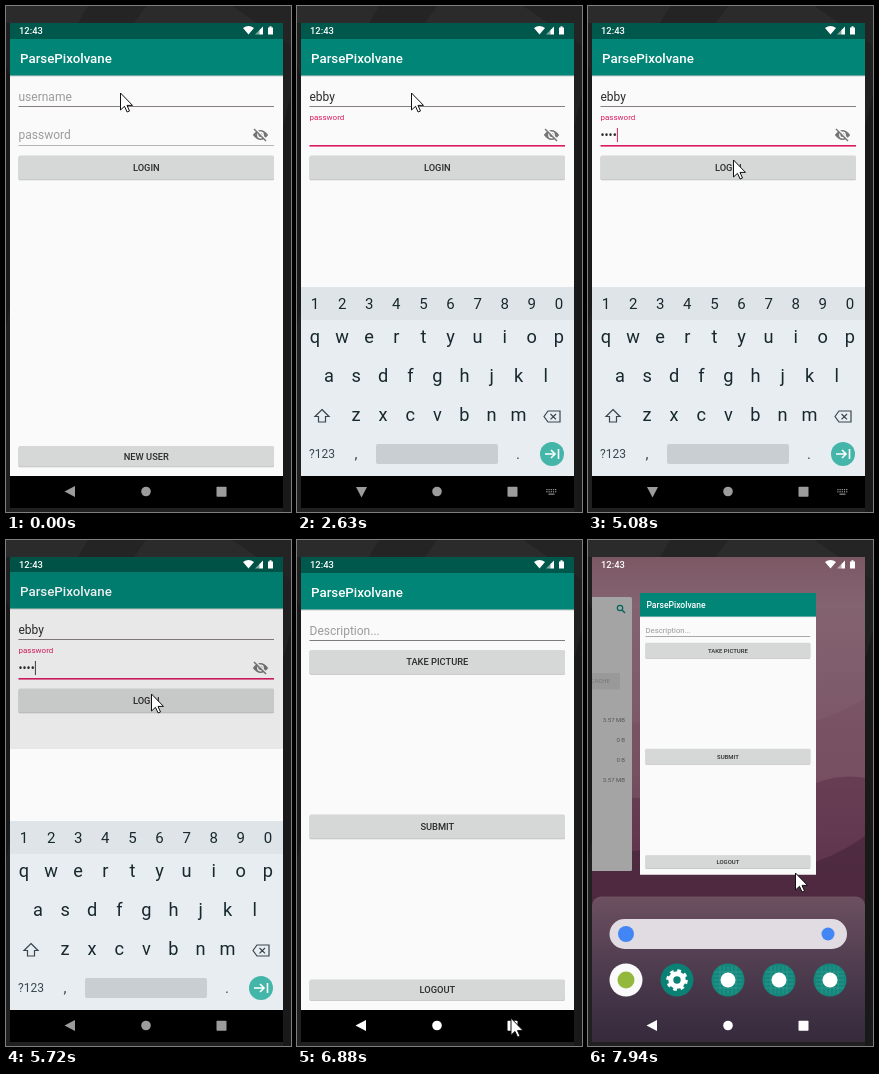
These frames come from a looping animation (285 px wide and 506 px high, 8 s). An HTML page:

```html
<!DOCTYPE html>
<html lang="en">
<head>
<meta charset="utf-8">
<title>Login and post</title>
<style>
  html, body { margin: 0; width: 100%; height: 100%; overflow: hidden; background: #222; }
  svg { display: block; width: 100%; height: 100%; font-family: Roboto, sans-serif; }
  text { white-space: pre; }
</style>
</head>
<body>
<svg id="stage" viewBox="0 0 285 506"></svg>
<script>
const LOOP = 8000, TITLE = 'ParsePixolvane', USER = 'ebby';
const PINK = '#d81b60', HINT = '#9b9b9b', INK = '#2b2b2b', TEAL = '#008577';

const STEPS = [0, 120, 270, 670, 820, 940, 1240, 1520, 2080, 2200, 2350, 2630, 2880, 3030, 3430,
  3890, 4040, 4160, 4310, 4480, 4630, 4930, 5080, 5600, 5720, 5840, 5960, 6080, 6230, 6350,
  6480, 6610, 6730, 6850, 7000, 7120, 7400, 7520, 7670, 7820, 7940];

// Keyframes: [time, value, ...]
const MOUSE = [[3740, 114.5, 87], [4630, 145.5, 154], [5720, 145.5, 154], [5840, 153, 176],
  [5960, 173.5, 227], [6610, 214, 462], [6730, 214, 476], [7120, 214, 483], [7400, 213, 472],
  [7520, 210, 432], [7670, 207.5, 388], [7820, 207.5, 350], [7940, 207.5, 333]];
const KEYBOARD = [[520, 189], [670, 120], [820, 25], [940, 0], [5720, 0], [5840, 90], [5960, 195]];
const REVEAL = [[5480, 470, 18], [5600, 450, 16], [5720, 209, 9], [5840, 60, 3], [5960, 17, 1], [6080, 17, 0]];
const EXIT = [[5480, 0, 0], [5720, -1, .07], [5960, -2, .1]];
const LABEL = [[1960, 0], [2080, .3], [2200, .8], [2350, 1]];
const OVERVIEW = [[7670, 0], [7820, .65], [7940, 1]];

function key(t, frames) {
  let i = frames.findIndex(f => f[0] > t);
  if (i === 0) return frames[0].slice(1);
  if (i < 0) return frames[frames.length - 1].slice(1);
  const a = frames[i - 1], b = frames[i], p = (t - a[0]) / (b[0] - a[0]);
  return a.slice(1).map((v, j) => v + (b[j + 1] - v) * p);
}

// Markup helpers
const rect = (x, y, w, h, fill, more = '') =>
  `<rect x="${x}" y="${y}" width="${w}" height="${h}" fill="${fill}" ${more}/>`;
const disc = (x, y, r, fill, more = '') => `<circle cx="${x}" cy="${y}" r="${r}" fill="${fill}" ${more}/>`;
const path = (d, more) => `<path d="${d}" ${more}/>`;
const text = (x, y, size, str, fill, more = '') =>
  `<text x="${x}" y="${y}" font-size="${size}" fill="${fill}" ${more}>${str}</text>`;
const mid = (x, y, size, str, fill, more = '') => text(x, y, size, str, fill, 'text-anchor="middle" ' + more);

const button = (y, h, label, id = '') =>
  rect(12.5, y + .8, 255.5, h, '#bdbdbd', 'rx="1.5"') +
  rect(12.5, y, 255.5, h, '#d6d7d7', `rx="1.5" ${id && `id="${id}"`}`) +
  mid(140.3, y + h / 2 + 3.3, 9.3, label, INK, 'font-weight="500"');

const page = body =>
  rect(4, 33, 273, 455, '#fafafa') + body +
  rect(4, 69, 273, 2.5, 'url(#shade)') +
  rect(4, 17, 273, 16.5, '#00574b') + rect(4, 33, 273, 36.5, TEAL) +
  text(14, 56.5, 13.3, TITLE, '#fff', 'font-weight="500"');

const eye =
  path('M246.8 129Q254.5 119 262.2 129Q254.5 139 246.8 129Z', 'fill="#757575"') +
  disc(254.5, 129, 3.4, '#fafafa') + disc(254.5, 129, 2.1, '#757575') +
  path('M248.8 122.2L261 134.4', 'stroke="#fafafa" stroke-width="1.8"') +
  path('M248 123L260 135', 'stroke="#757575" stroke-width="1.4"');

const login = page(
  text(12.5, 95, 12, 'username', HINT, 'id="user"') +
  rect(12.5, 100, 255.5, 1, '#857f85', 'id="userLine"') +
  text(12.5, 133, 12, 'password', HINT, 'id="label"') +
  text(12.5, 133, 12, '', INK, 'id="pass"') +
  rect(12.5, 139, 255.5, 1, '#b5b5b5', 'id="passLine"') +
  rect(0, 0, 1, 14, PINK, 'id="caret"') + eye +
  button(149.5, 24, 'LOGIN', 'loginBtn') + button(440, 20.5, 'NEW USER'));

const post = page(
  text(12.5, 95, 12, 'Description...', HINT) +
  rect(12.5, 100, 255.5, 1, '#b0b0b0', 'id="descLine"') +
  button(110, 24, 'TAKE PICTURE') + button(274.5, 24, 'SUBMIT') + button(439.5, 20.5, 'LOGOUT'));

const keyRow = (chars, x, y, size) =>
  [...chars].map((c, i) => mid(x + i * 27.1, y, size, c, '#17282e')).join('');
const line = 'fill="none" stroke="#37474f" stroke-width="1.2"';
const keyboard =
  rect(4, 281, 273, 189, '#e8edf1') + rect(4, 281, 273, 33, '#dfe4e8') +
  keyRow('1234567890', 18, 303, 15) + keyRow('qwertyuiop', 18, 337, 18.2) +
  keyRow('asdfghjkl', 32, 376, 18.2) + keyRow('zxcvbnm', 59, 415, 18.2) +
  path('M25 403.5L32 410.5H28.5V416H21.5V410.5H18Z', line) +
  path('M247 410.5L251 405H263V416H251ZM253.5 408L259 413.4M259 408L253.5 413.4', line) +
  text(12, 452, 12, '?123', '#37474f') + mid(59, 453, 15, ',', '#37474f') + mid(221, 453, 15, '.', '#37474f') +
  rect(79, 438, 122, 20, '#c9ced2', 'rx="2"') + disc(255, 448, 12, '#43b5a9') +
  path('M248 448H258M254 444L258 448L254 452M261.5 443V453', 'fill="none" stroke="#fff" stroke-width="1.6"');

const nav =
  rect(180, 472, 70, 27, '#fff', 'rx="13.5" opacity=".16" id="ripple"') +
  `<g id="navIcons">` +
  path('M58.5 485.5L69 480V491Z', 'id="back"') + path('M59 481H70L64.5 491.5Z', 'id="down"') +
  disc(140, 485.5, 4.8, 'inherit') + rect(210.5, 480.8, 10, 10, 'inherit', 'rx=".8"') +
  `<g id="dots">` + [0, 1].map(r => [0, 1, 2, 3, 4].map(c =>
    rect(249.3 + c * 2.2, 483 + r * 2.2, 1.2, 1.2, 'inherit')).join('')).join('') +
  rect(251.5, 487.6, 6, 1.1, 'inherit') + '</g></g>';

const gridIcon = x => disc(x, 440, 16.5, '#14877c') +
  path([-8, -4, 0, 4, 8].map(d => `M${x + d} 426V454M${x - 14} ${440 + d}H${x + 14}`).join(''),
    'stroke="#4fa79f" stroke-width=".4"') + disc(x, 440, 7.5, '#fff');

const home =
  rect(4, 17, 273, 485, 'url(#sky)') +
  path('M4 195Q80 168 150 182T277 158V262H4Z', 'fill="#6f465a" opacity=".25"') +
  path('M4 268Q40 246 90 270T190 262T277 238V502H4Z', 'fill="#5c3149" opacity=".55"') +
  path('M4 318Q70 300 140 322T277 296V502H4Z', 'fill="#45233a" opacity=".6"') +
  `<g id="side">` + rect(-130, 57, 174, 274, '#a4a4a4', 'rx="1.5"') +
  disc(32, 68, 2.7, 'none', 'stroke="#00665b" stroke-width="1.2"') +
  path('M34 70L37 73', 'stroke="#00665b" stroke-width="1.4"') +
  rect(-60, 133, 92, 16.5, '#999', 'rx="1"') +
  text(22, 143.3, 6, 'CACHE', '#777', 'text-anchor="end"') +
  ['3.57 MB', '0 B', '0 B', '3.57 MB'].map((s, i) =>
    text(37, 181.5 + i * 20, 6, s, '#555', 'text-anchor="end"')).join('') + '</g>' +
  `<g id="dock">` + rect(4, 356.5, 273, 170, 'url(#panel)', 'rx="9"') +
  rect(21.5, 379, 237.5, 30, '#e1dce1', 'rx="15"') +
  disc(38, 394, 8, '#4285f4') + disc(240, 394, 6.5, '#4285f4') +
  disc(38, 440, 16.5, '#fafafa') + disc(38, 440, 8.5, '#93b83c') +
  disc(89, 440, 16.5, '#0b8074') +
  disc(89, 440, 6.2, 'none', 'stroke="#fff" stroke-width="5"') +
  disc(89, 440, 9.3, 'none', 'stroke="#fff" stroke-width="3" stroke-dasharray="3.65"') +
  [140, 191, 242].map(gridIcon).join('') + '</g>';

const status = text(13, 28.3, 9.4, '12:43', '#fff', 'font-weight="500"') +
  path('M237 22Q242.5 17.8 248 22L242.5 28.5ZM257 20.5V28.5H253.5V24ZM262 21.5H263.5V20.3H265.5V21.5H267V28.5H262Z', 'fill="#fff"') +
  path('M254 23.5V28.5H249Z', 'fill="#fff" opacity=".5"');

const gradient = (id, ...stops) => `<linearGradient id="${id}" x2="0" y2="1">` +
  stops.map(([at, c, o = 1]) => `<stop offset="${at}" stop-color="${c}" stop-opacity="${o}"/>`).join('') +
  '</linearGradient>';

const stage = document.getElementById('stage');
stage.innerHTML = '<defs>' +
  gradient('shade', [0, '#000', .22], [1, '#000', 0]) +
  gradient('sky', [0, '#7b5864'], [.1, '#846370'], [.45, '#785364'], [.7, '#5c344b'], [1, '#3c2639']) +
  gradient('panel', [0, '#6c5060'], [.4, '#503d50'], [.8, '#382c3e'], [1, '#332838']) +
  `<clipPath id="screen">${rect(4, 17, 273, 485, '#000')}</clipPath>` +
  `<clipPath id="open">${rect(4, 17, 273, 485, '#000', 'id="openRect"')}</clipPath>` +
  `<clipPath id="card">${rect(4, 17, 273, 453, '#000', 'id="cardRect"')}</clipPath></defs>` +
  rect(0, 0, 285, 506, '#202020') + rect(0, 0, 285, 17, '#2b2b2b') +
  path('M82 0H140L128 17H72ZM226 0H285V40Z', 'fill="#242424"') +
  path('M0 60L4 70V300L0 320ZM277 120L285 90V506H277Z', 'fill="#191919"') +
  `<g clip-path="url(#screen)">` + rect(4, 17, 273, 485, '#000') +
  `<g id="home">${home}</g><g id="login">${login}</g>` +
  rect(4, 17, 273, 453, '#000', 'id="dim"') +
  `<g id="post" clip-path="url(#open)"><g id="window"><g clip-path="url(#card)">${post}</g></g></g>` +
  `<g id="keyboard">${keyboard}</g>` + rect(4, 470, 273, 32, '#000', 'id="navBar"') + nav + status + '</g>' +
  `<g id="mouse">${path('M0 0V17L4 13.3L6.6 19L9 18L6.5 12.4H12Z',
    'fill="#fff" stroke="#111" stroke-width="1" stroke-linejoin="round"')}</g>`;

const el = {};
stage.querySelectorAll('[id]').forEach(n => el[n.id] = n);
const set = (id, attrs) => { for (const a in attrs) el[id].setAttribute(a, attrs[a]); };
const show = (id, on) => set(id, { display: on ? 'inline' : 'none' });
const move = (id, x, y, k = 1) => set(id, { transform: `translate(${x} ${y}) scale(${k})` });

function drawLogin(t) {
  const typed = t < 940 ? 0 : t < 1240 ? 1 : t < 1520 ? 2 : 4;
  el.user.textContent = USER.slice(0, typed) || 'username';
  set('user', { fill: typed ? INK : HINT });
  const inUser = t >= 120 && t < 2080, inPass = t >= 2200;
  set('userLine', { fill: inUser ? PINK : '#857f85', height: inUser ? 1.5 : 1 });
  set('passLine', { fill: inPass ? PINK : '#b5b5b5', height: inPass ? 1.6 : 1 });

  const [p] = key(t, LABEL);
  set('label', { y: 133 - 19 * p, 'font-size': 12 - 4 * p, fill: p > .5 ? PINK : HINT });
  el.pass.textContent = t < 2880 ? '' : t < 3030 ? 't' : t < 3430 ? '•e' : t < 4930 ? '•••t' : '••••';

  const field = inUser ? el.user : el.pass;
  const width = inUser && !typed ? 0 : field.getComputedTextLength();
  show('caret', t >= 270 && (inUser || inPass) && !(t >= 2630 && t < 2880));
  set('caret', { x: 12.7 + width, y: inUser ? 84 : 122, fill: t < 5600 ? PINK : '#444' });
  set('loginBtn', { fill: t >= 4930 && t < 5080 ? '#bfc0c0' : '#d6d7d7' });

  const [y, dim] = key(t, EXIT);
  move('login', 0, y);
  set('dim', { opacity: dim });
}

function drawPost(t) {
  const [top, y] = key(t, REVEAL), [p] = key(t, OVERVIEW);
  const k = 1 - .355 * p, away = p > 0;
  show('post', t >= 5600);
  set('openRect', { y: top });
  set('cardRect', { y: away ? 33 : 17, height: away ? 437 : 480 });
  move('window', 4 + 48 * p - 4 * k, 33 + 20 * p - 33 * k + y, k);
  set('descLine', { fill: t < 6080 ? '#b0b0b0' : '#7d7d7d' });
  show('home', away);
  move('side', -70 * (1 - p), 0);
  move('dock', 0, 130 * (1 - p));
  set('navBar', { opacity: 1 - p });
}

function draw(t) {
  show('login', t < 6080);
  show('dim', t < 6080);
  if (t < 6080) drawLogin(t);
  drawPost(t);

  const [drop] = key(t, KEYBOARD), typing = t >= 820 && t < 5600;
  show('keyboard', drop < 189);
  move('keyboard', 0, drop);
  show('back', !typing);
  show('down', typing);
  show('dots', typing);
  show('ripple', t >= 7000 && t < 7400);
  set('navIcons', { fill: t < 6850 ? '#9c9c9c' : '#fff' });
  move('mouse', ...key(t, MOUSE));
}

let last = -1;
function tick(now) {
  const t = now % LOOP;
  const step = STEPS.filter(s => s <= t).pop();
  if (step !== last) draw(last = step);
  requestAnimationFrame(tick);
}
draw(0);
requestAnimationFrame(tick);
</script>
</body>
</html>
```
